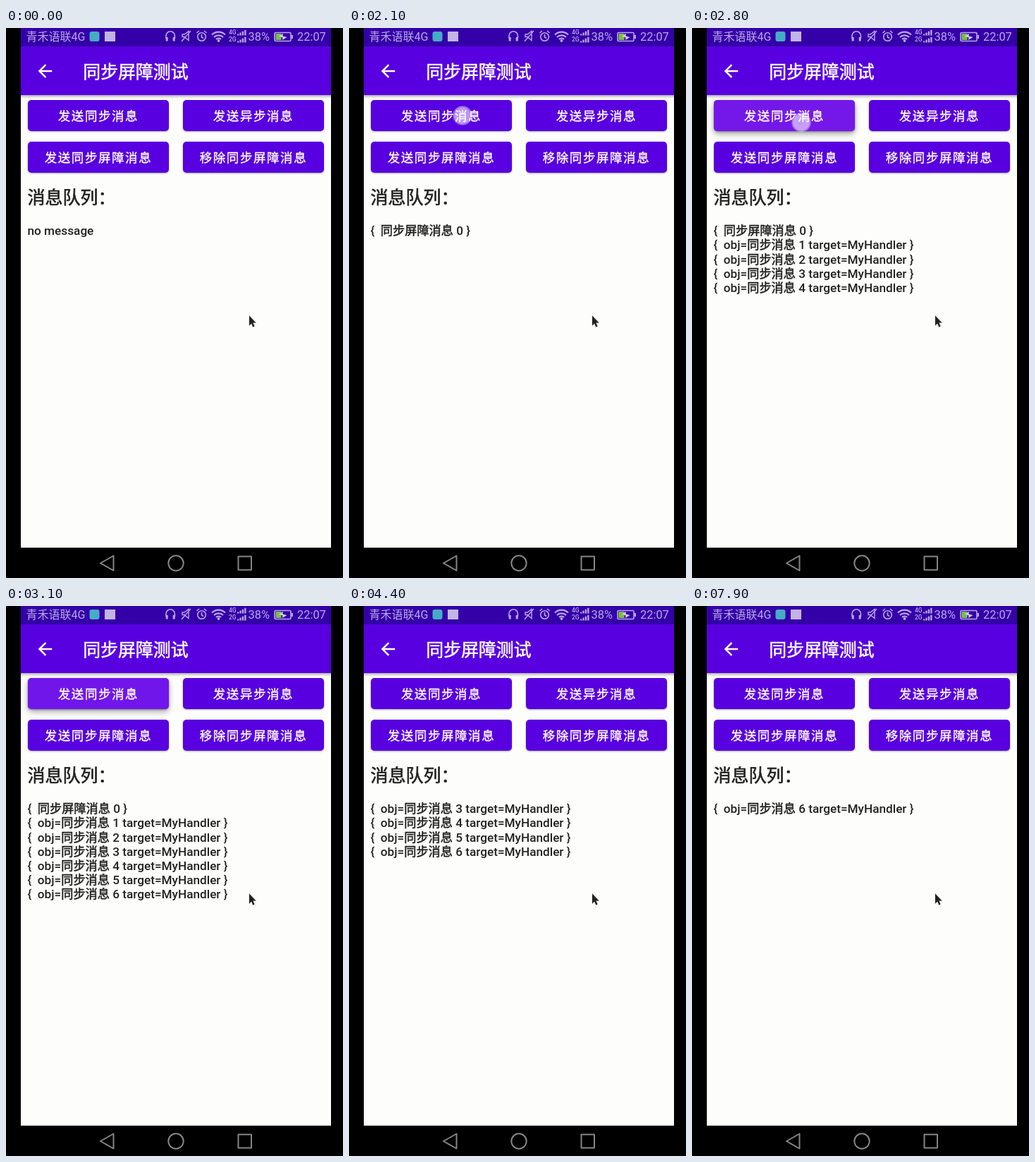
These frames come from a looping animation (478x779 px, 8 s). An HTML page:

```html
<!DOCTYPE html>
<html lang="zh-CN">
<head>
<meta charset="utf-8">
<title>同步屏障测试</title>
<style>
html, body { margin: 0; width: 100%; height: 100%; overflow: hidden; background: #000; }
svg { display: block; width: 100%; height: 100%; }
text { font-family: Roboto, "Noto Sans CJK SC", "Noto Sans CJK", sans-serif; white-space: pre; }
.status text { fill: #baa8e6; font-size: 16.4px; }
.status text.tiny { font-size: 8.5px; font-weight: 500; }
.title { font-size: 24.9px; font-weight: 500; fill: #fff; stroke: #fff; stroke-width: .55px; }
.label { font-size: 17.5px; font-weight: 500; letter-spacing: 1.56px; fill: #fff; stroke: #fff; stroke-width: .35px; text-anchor: middle; }
.head { font-size: 25px; font-weight: 500; fill: #222; stroke: #222; stroke-width: .65px; }
.row { font-size: 17.2px; font-weight: 500; fill: #222; }
.row .han { stroke: #222; stroke-width: .5px; }
.line { fill: none; stroke: #baa8e6; stroke-width: 1.6; }
.nav { fill: none; stroke: #858585; stroke-width: 2; stroke-linejoin: round; }
</style>
</head>
<body>
<svg viewBox="0 0 478 779">
  <defs>
    <linearGradient id="barShade" x2="0" y2="1">
      <stop stop-color="#000" stop-opacity=".28"/>
      <stop offset="1" stop-color="#000" stop-opacity="0"/>
    </linearGradient>
    <radialGradient id="dot">
      <stop stop-color="#fff" stop-opacity=".56"/>
      <stop offset=".72" stop-color="#fff" stop-opacity=".6"/>
      <stop offset=".86" stop-color="#fff" stop-opacity=".45"/>
      <stop offset="1" stop-color="#fff" stop-opacity="0"/>
    </radialGradient>
    <filter id="soft" x="-10%" y="-30%" width="120%" height="170%"><feGaussianBlur stdDeviation="1.3"/></filter>
    <filter id="wide" x="-10%" y="-40%" width="120%" height="190%"><feGaussianBlur stdDeviation="4"/></filter>
  </defs>

  <rect width="478" height="779"/>
  <rect x="21" width="440" height="736" fill="#fdfdfb"/>
  <rect x="21" y="95" width="440" height="5" fill="url(#barShade)"/>
  <rect x="21" y="26" width="440" height="69" fill="#5800e0"/>
  <rect x="21" width="440" height="26" fill="#3400a8"/>

  <g class="status">
    <text x="28.5" y="18" style="font-size:16px">青禾语联4G</text>
    <rect x="118.5" y="5" width="14" height="14" rx="3" fill="#45acc6"/>
    <rect x="140" y="5" width="15" height="14" fill="#c3b4e6"/>
    <g class="line">
      <path d="M227 15V11a6.2 6.2 0 0 1 12.4 0V15"/>
      <path d="M228.2 13v5.5M238.2 13v5.5" stroke-width="3"/>
      <path d="M250 9h3l6-4.5v13l-6-5h-3zM262 4L249 19" stroke-width="1.4"/>
      <circle cx="277.5" cy="12.5" r="5.8"/>
      <path d="M277.5 9v4l2.6 1.5M270.5 7l3.5-3M284.5 7l-3.5-3"/>
      <path d="M292 9.5a13.5 13.5 0 0 1 19 0M295 13a9.2 9.2 0 0 1 13 0M298 16a5 5 0 0 1 7 0" stroke-width="2.2"/>
      <rect x="381" y="6.5" width="23" height="12" rx="1.5"/>
    </g>
    <circle cx="301.5" cy="18" r="1.9" fill="#baa8e6"/>
    <text class="tiny" x="316" y="9">4G</text>
    <text class="tiny" x="316" y="19">2G</text>
    <g id="signal" fill="#baa8e6"></g>
    <text x="343.5" y="18">38%</text>
    <rect x="404.5" y="10" width="2.5" height="5" fill="#baa8e6"/>
    <rect x="382.5" y="8" width="8" height="9" fill="#79bf45"/>
    <path d="M387 11.5l6-3.5-.5 3.5 6 1.5-6.5 4 .5-3.5z" fill="#d8cdf2"/>
    <text x="413" y="18">22:07</text>
  </g>

  <path transform="translate(40.8 46.3) scale(1.222)" fill="#fff"
    d="M20 11H7.83l5.59-5.59L12 4l-8 8 8 8 1.41-1.41L7.83 13H20z"/>
  <text class="title" x="109.3" y="71">同步屏障测试</text>
  <g id="buttons"></g>
  <text class="head" x="30.5" y="249">消息队列：</text>
  <g id="queue"></g>
  <circle id="touch" r="14.5" fill="url(#dot)"/>

  <path d="M345 407.5v14l3.1-2.9 2.2 4.8 2.2-1-2.1-4.8h4.1z" fill="#222" stroke="#e4e4e2" stroke-width="2" paint-order="stroke" stroke-linejoin="round"/>

  <g class="nav">
    <path d="M152.5 747.5v21L134 758z"/>
    <circle cx="241" cy="758" r="10.7"/>
    <rect x="329.5" y="748.5" width="18.5" height="19"/>
  </g>
</svg>
<script>
const LOOP = 8000, STEP = 100;
const NS = "http://www.w3.org/2000/svg";
const $ = id => document.getElementById(id);
const clamp = v => Math.max(0, Math.min(1, v));

function add(parent, tag, attrs, text = "") {
  const el = document.createElementNS(NS, tag);
  for (const key in attrs) el.setAttribute(key, attrs[key]);
  el.textContent = text;
  return parent.appendChild(el);
}

// Two rows of signal bars
for (let row = 0; row < 2; row++)
  for (let i = 0; i < 4; i++) {
    const h = 2 + i * 1.9;
    add($("signal"), "rect", { x: 328 + i * 3.4, y: 10.5 + row * 10 - h, width: 2.3, height: h });
  }

function makeButton(x, y, label) {
  const g = add($("buttons"), "g", {});
  const box = (dy, attrs) => add(g, "rect", { x, y: y + dy, width: 200, height: 44, rx: 5, ...attrs });
  box(1, { opacity: 0.34, filter: "url(#soft)" });
  const lift = box(4, { filter: "url(#wide)" });
  box(0, { fill: "#5800e0" });
  const glow = box(0, { fill: "#9030f5" });
  add(g, "text", { class: "label", x: x + 100, y: y + 29.3 }, label);
  return level => {
    lift.setAttribute("opacity", 0.34 * level);
    glow.setAttribute("opacity", 0.5 * level);
  };
}

const sync = makeButton(31, 102, "发送同步消息");
makeButton(251, 102, "发送异步消息")(0);
const barrier = makeButton(31, 161, "发送同步屏障消息");
const remove = makeButton(251, 161, "移除同步屏障消息");

const rows = Array.from({ length: 7 }, (_, i) => {
  const el = add($("queue"), "text", { class: "row", x: 30.5, y: 293.2 + i * 20.17 });
  const parts = ["lead", "han", "tail"].map(name => add(el, "tspan", { class: name }));
  return (texts = []) => parts.forEach((part, k) => { part.textContent = texts[k] || ""; });
});

// Quick taps on the sync button, each adding one message on release
const TAPS = 6, FIRST = 2100, GAP = 175, HOLD = 100;
const tapStart = i => FIRST + i * GAP;
const BARRIER_ON = 1500, BARRIER_OFF = 3700;
const HANDLED = [4400, 4400, 5500, 6600, 7900];

const touches = [
  { from: 1300, to: 1500, x: 146, y: 186 },
  ...Array.from({ length: TAPS }, (_, i) =>
    ({ from: tapStart(i), to: tapStart(i) + HOLD, x: 161 - i * 1.5, y: 124 + i * 2.4 })),
  { from: 3500, to: 3700, x: 373, y: 188.5 }
];

// Each message is split into plain, Chinese and plain parts
function messages(t) {
  if (t < BARRIER_ON) return [["no message"]];
  const list = t < BARRIER_OFF ? [["{  ", "同步屏障消息", " 0 }"]] : [];
  const done = HANDLED.filter(at => t >= at).length;
  for (let i = done; i < TAPS; i++)
    if (t >= tapStart(i) + HOLD) list.push(["{  obj=", "同步消息", ` ${i + 1} target=MyHandler }`]);
  return list;
}

// Ramps up after the press, fades after the release
const pressLevel = (t, down, up) => clamp((t - down) / 200) * clamp(1 - (t - up) / 350);

function draw(time) {
  const t = Math.floor((time % LOOP) / STEP) * STEP;
  barrier(pressLevel(t, 1300, 1500));
  sync(pressLevel(t, FIRST, tapStart(TAPS - 1) + HOLD));
  remove(pressLevel(t, 3500, 3700));

  const list = messages(t);
  rows.forEach((show, i) => show(list[i]));

  const touch = touches.find(p => t >= p.from && t < p.to);
  $("touch").setAttribute("opacity", touch ? 1 : 0);
  if (touch) {
    $("touch").setAttribute("cx", touch.x);
    $("touch").setAttribute("cy", touch.y);
  }
}

const start = performance.now();
function tick() {
  draw(performance.now() - start);
  requestAnimationFrame(tick);
}
tick();
</script>
</body>
</html>
```
